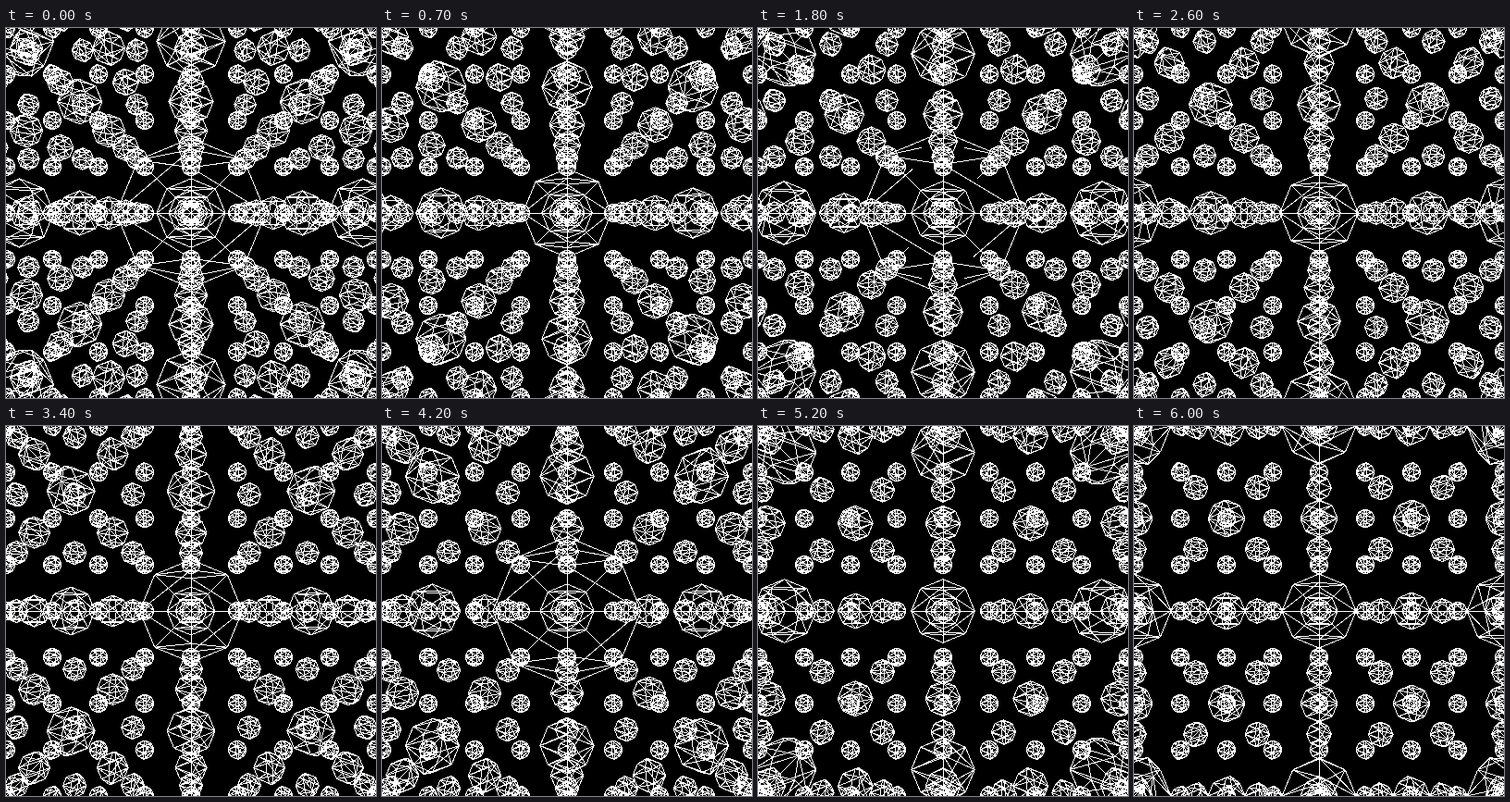
An HTML page with a canvas for the animation above (6.1 s loop, 400 by 400 pixels).

```html
<!DOCTYPE html>
<html lang="en">
<head>
<meta charset="utf-8">
<title>Sphere lattice</title>
<style>
html, body { margin: 0; width: 100%; height: 100%; overflow: hidden; background: #000; }
canvas { display: block; }
</style>
</head>
<body>
<canvas id="stage" width="400" height="400"></canvas>
<script>
const SIZE = 400, HALF = SIZE / 2;
const EYE = HALF / Math.tan(Math.PI / 6);
const NEAR = EYE / 10;
const GAP = 50, RADIUS = 10, REACH = 4;
const STEPS = 61, STEP_MS = 100;

const ctx = document.getElementById('stage').getContext('2d');
const image = ctx.createImageData(SIZE, SIZE);
const pixels = new Uint32Array(image.data.buffer);
const BLACK = 0xff000000, WHITE = 0xffffffff;

// Sphere with four meridians and four bands, split into triangles
const point = (row, col) => {
  const phi = Math.PI * (row / 4 - 0.5), theta = Math.PI * col / 2;
  return [
    RADIUS * Math.cos(phi) * Math.sin(theta),
    RADIUS * Math.sin(phi),
    RADIUS * Math.cos(phi) * Math.cos(theta)
  ];
};

const edges = [];
for (let col = 0; col < 4; col++) {
  for (let row = 0; row < 4; row++) {
    edges.push([point(row, col), point(row + 1, col)]);
    if (row > 0) edges.push([point(row, col), point(row, col + 1)]);
    if (row === 1 || row === 2) edges.push([point(row + 1, col), point(row, col + 1)]);
  }
}

// Hard-edged line, one pixel wide
function line(x0, y0, x1, y1) {
  const steep = Math.abs(y1 - y0) > Math.abs(x1 - x0);
  if (steep) [x0, y0, x1, y1] = [y0, x0, y1, x1];
  if (x0 > x1) [x0, y0, x1, y1] = [x1, y1, x0, y0];
  const slope = x1 - x0 > 1e-6 ? (y1 - y0) / (x1 - x0) : 0;
  const half = Math.hypot(1, slope) / 2;
  const end = Math.min(SIZE, Math.ceil(x1 - 0.5));
  for (let a = Math.max(0, Math.ceil(x0 - 0.5)); a < end; a++) {
    const mid = y0 + slope * (a + 0.5 - x0) - 0.499;
    const last = Math.min(SIZE, Math.ceil(mid + half));
    for (let b = Math.max(0, Math.ceil(mid - half)); b < last; b++) {
      pixels[steep ? a * SIZE + b : b * SIZE + a] = WHITE;
    }
  }
}

function edge(p, q, x, y, depth) {
  let dp = depth - p[2], dq = depth - q[2];
  if (dp < NEAR && dq < NEAR) return;
  let px = x + p[0], py = y + p[1], qx = x + q[0], qy = y + q[1];
  if (dp < NEAR) {
    const k = (NEAR - dp) / (dq - dp);
    px += (qx - px) * k; py += (qy - py) * k; dp = NEAR;
  } else if (dq < NEAR) {
    const k = (NEAR - dq) / (dp - dq);
    qx += (px - qx) * k; qy += (py - qy) * k; dq = NEAR;
  }
  const sp = EYE / dp, sq = EYE / dq;
  line(HALF + px * sp, HALF + py * sp, HALF + qx * sq, HALF + qy * sq);
}

function draw(step) {
  pixels.fill(BLACK);
  const layerGap = 50 + 0.6 * (step + 1);
  for (let depth = EYE; depth + RADIUS > NEAR; depth -= layerGap) {
    const limit = HALF * (depth + RADIUS) / EYE + RADIUS;
    for (let i = -REACH; i <= REACH; i++) {
      for (let j = -REACH; j <= REACH; j++) {
        const x = i * GAP, y = j * GAP;
        if (Math.abs(x) > limit || Math.abs(y) > limit) continue;
        for (const [p, q] of edges) edge(p, q, x, y, depth);
      }
    }
  }
  ctx.putImageData(image, 0, 0);
}

const start = performance.now();
let shown = -1;
function tick() {
  const step = Math.floor((performance.now() - start) / STEP_MS) % STEPS;
  if (step !== shown) draw(shown = step);
  requestAnimationFrame(tick);
}
tick();
</script>
</body>
</html>
```
